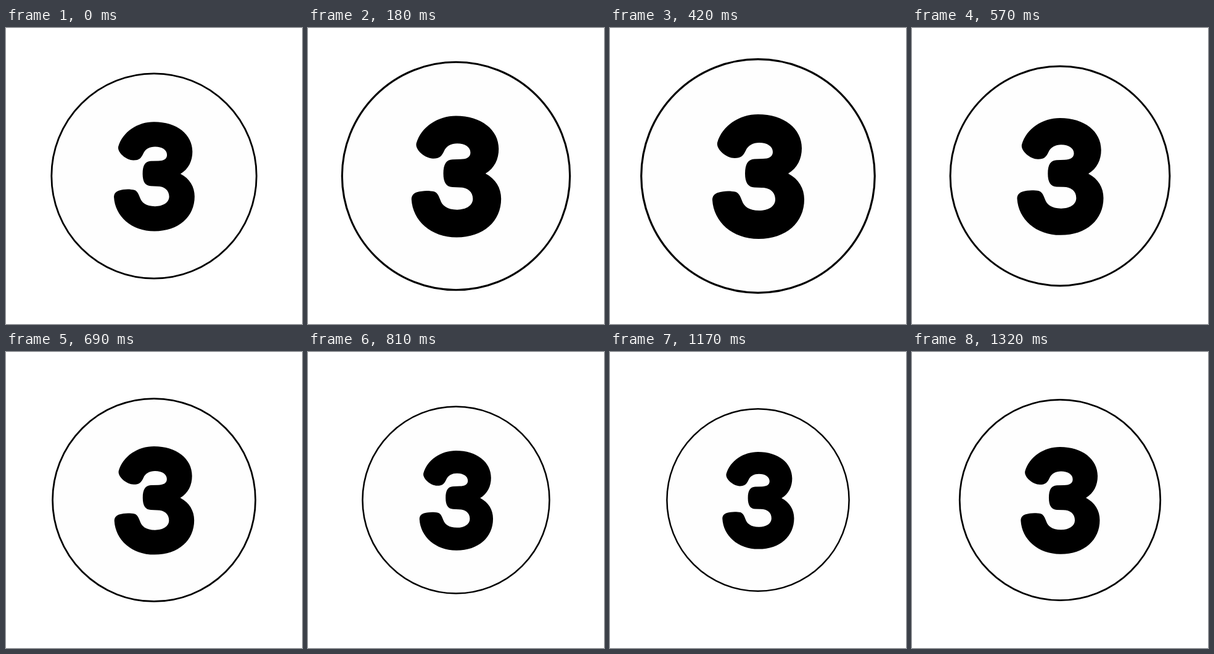
Animation, 480 px wide and 480 px high, one loop 1.35 s. Source, as an HTML page with a canvas:

```html
<!DOCTYPE html>
<html lang="en">
<head>
<meta charset="utf-8">
<title>Pulsing 3</title>
<style>
  html, body { margin: 0; width: 100%; height: 100%; overflow: hidden; background: #fff; }
  canvas { display: block; }
</style>
</head>
<body>
<canvas id="stage" width="480" height="480"></canvas>
<script>
const ctx = document.getElementById("stage").getContext("2d");
const SIZE = 480, LOOP = 1350, STEP = 30;
const RADIUS = 167.6, LINE = 2.8, SWING = 0.15;
const DIGIT_SCALE = 0.878;

// The digit, centred on the origin
const digit = new Path2D(`
  M0-100 C-30-100-58-82-66-54 C-68-43-51-29-38-29
  C-27-29-24-33-20-41 C-16-50-8-54 2-54
  C15-54 24-48 24-39 C24-31 17-28 8-28 L-6-27.5
  C-16-27-21-20-21-4 C-21 11-16 18-6 18.5 L6 19
  C19 19 28 26 28 38 C28 49 17 56 2 56
  C-15 56-23 49-26 40 C-30 29-33 25-42 25
  C-50 24-58 25-65 27 C-71 29-74 33-74 39
  C-72 74-42 102 1 102 C46 102 75 75 75 38
  C75 20 66 5 49-4 C64-13 71-28 71-45
  C71-77 42-100 0-100 Z`);

function draw(time) {
  const t = Math.floor((time % LOOP) / STEP) * STEP;
  const scale = 1 + SWING * Math.sin(2 * Math.PI * t / LOOP);

  ctx.setTransform(1, 0, 0, 1, 0, 0);
  ctx.fillStyle = "#fff";
  ctx.fillRect(0, 0, SIZE, SIZE);
  ctx.translate(SIZE / 2, SIZE / 2);
  ctx.scale(scale, scale);

  ctx.beginPath();
  ctx.arc(0, 0, RADIUS - LINE / 2, 0, 2 * Math.PI);
  ctx.fillStyle = "#fefefe";
  ctx.fill();
  ctx.lineWidth = LINE;
  ctx.strokeStyle = "#000";
  ctx.stroke();

  ctx.scale(DIGIT_SCALE, DIGIT_SCALE);
  ctx.fillStyle = "#000";
  ctx.fill(digit);
}

const start = performance.now();
function tick() {
  draw(performance.now() - start);
  requestAnimationFrame(tick);
}
tick();
</script>
</body>
</html>
```
